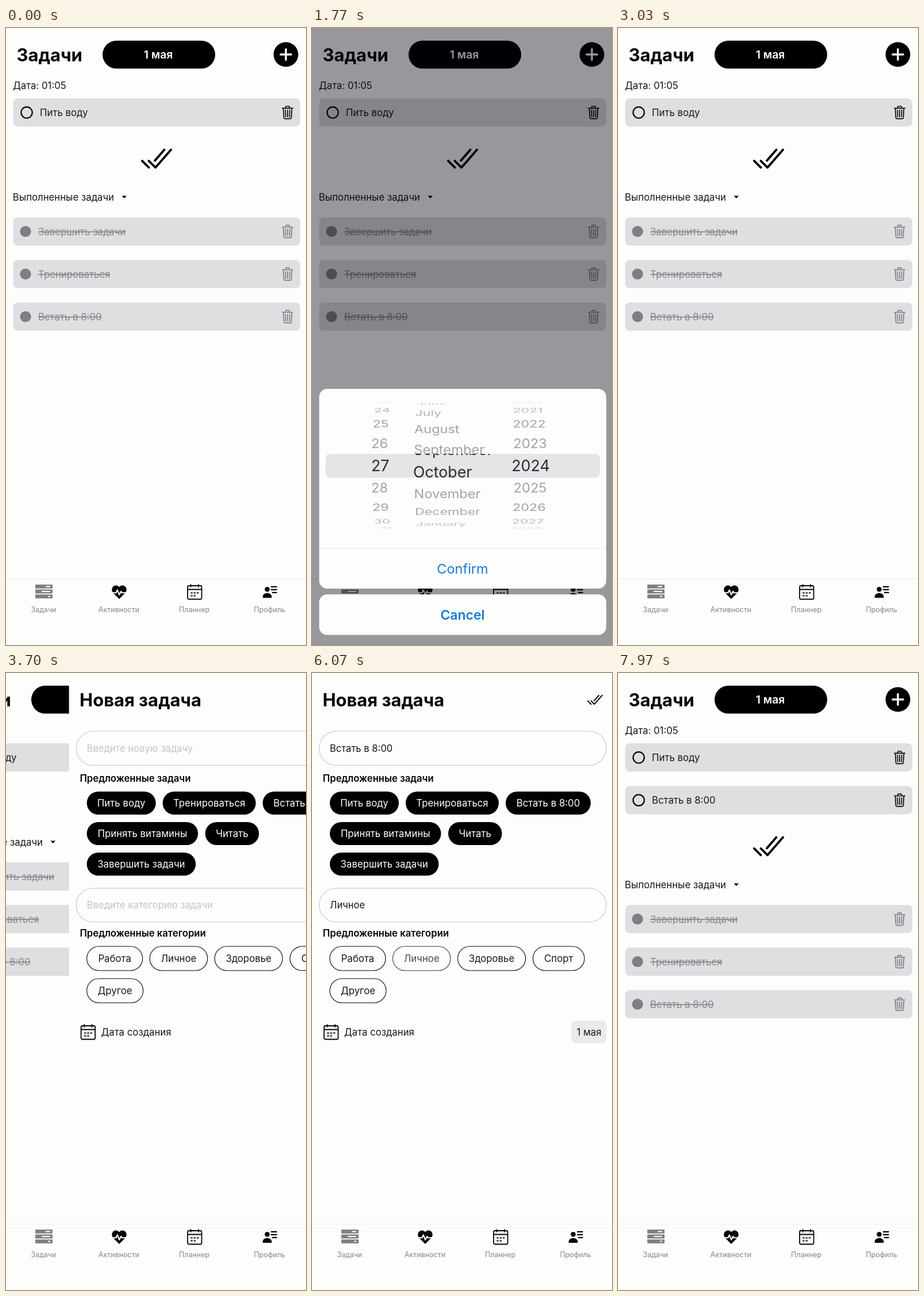
Recreate the animation shown at these times as an HTML page. Size 522 by 1072 pixels, loop 8000 ms.

```html
<!DOCTYPE html>
<html lang="ru">
<head>
<meta charset="utf-8">
<title>Задачи</title>
<style>
html, body { margin: 0; width: 100%; height: 100%; overflow: hidden; background: #fdfdfc; }
svg { display: block; width: 100vw; height: 100vh; }
text { font-family: Inter, "Open Sans", sans-serif; white-space: pre; }
.line { fill: none; stroke: currentColor; stroke-linecap: round; stroke-linejoin: round; }
</style>
</head>
<body>
<svg id="stage" viewBox="0 0 522 1072"></svg>
<script>
const LOOP = 8000, W = 522;
const PAPER = '#fdfdfc', INK = '#050408', SOFT = '#19181c', GRAY = '#807e83', CARD = '#e0dee1', BLUE = '#147bd6';
const MONTHS = ['January', 'February', 'March', 'April', 'May', 'June', 'July',
  'August', 'September', 'October', 'November', 'December'];

// Markup helpers
const text = (x, y, size, str, { weight = 400, fill = weight > 400 ? INK : SOFT, anchor = 'start', extra = '' } = {}) =>
  `<text x="${x}" y="${y + size * 0.36}" font-size="${size}" font-weight="${weight}" fill="${fill}" text-anchor="${anchor}" ${extra}>${str}</text>`;
const rect = (x, y, w, h, r, fill, extra = '') =>
  `<rect x="${x}" y="${y}" width="${w}" height="${h}" rx="${r}" fill="${fill}" ${extra}/>`;
const group = (id, body, extra = '') => `<g id="${id}" ${extra}>${body}</g>`;
const icon = (cx, cy, scale, color, body) =>
  `<g class="line" color="${color}" stroke-width="32" transform="translate(${cx} ${cy}) scale(${scale}) translate(-256 -256)">${body}</g>`;

const trash = (y, color) => icon(490, y, 0.0521, color, `<path d="M112 112l20 320c1 18 14 32 32 32h184c18 0 31-14 32-32l20-320
  M80 112h352M192 112V72a24 24 0 0 1 24-24h80a24 24 0 0 1 24 24v40M256 176v224M184 176l8 224M328 176l-8 224"/>`);
const checks = (cx, cy, scale) => icon(cx, cy, scale, INK,
  '<path d="M464 128L240 384l-96-96M144 384l-96-96M368 128L232 284"/>');
const calendar = (x, y) => `<g class="line" color="${INK}" stroke-width="1.8" transform="translate(${x} ${y})">
  <rect x="1" y="3" width="24.5" height="23.5" rx="2.5"/>
  <path d="M1 9.5h24.5M6.5 1v4M20 1v4M7 15.5h2M12.3 15.5h2M17.6 15.5h2M7 20.5h2M12.3 20.5h2" /></g>`;

function openTask(y, name) {
  return rect(12.5, y - 24.5, 499.5, 49, 8, CARD) +
    `<circle cx="36" cy="${y}" r="9.7" fill="none" stroke="${INK}" stroke-width="2.2"/>` +
    text(59, y, 16.8, name) + trash(y, INK);
}
function doneTask(y, name) {
  return rect(12.5, y - 24.5, 499.5, 49, 8, CARD) +
    `<circle cx="34" cy="${y}" r="9.6" fill="${GRAY}"/>` +
    text(56, y, 16.8, name, { fill: '#87858a', extra: 'text-decoration="line-through"' }) + trash(y, GRAY);
}

const listScreen = rect(0, 0, W, 1072, 0, PAPER) +
  text(18.5, 46.5, 31, 'Задачи', { weight: 700 }) +
  rect(168, 22, 196, 48.5, 24.2, '#000') +
  text(265, 46.5, 19.3, '1 мая', { fill: '#fff', weight: 600, anchor: 'middle' }) +
  '<circle cx="487" cy="46" r="21.5" fill="#000"/>' +
  '<path class="line" color="#fff" stroke-width="3.4" d="M477.8 46h18.4M487 36.8v18.4"/>' +
  text(12, 99.5, 16.8, 'Дата: 01:05') +
  openTask(146.8, 'Пить воду') +
  group('added', openTask(221, 'Встать в 8:00')) +
  group('rest', checks(262, 227, 0.1205) +
    text(11.8, 293.5, 16.8, 'Выполненные задачи') +
    `<path d="M201.5 291.5h8.6l-4.3 4.6z" fill="${INK}"/>` +
    ['Завершить задачи', 'Тренироваться', 'Встать в 8:00'].map((s, i) => doneTask(353.5 + i * 74, s)).join(''));

function chip(x, y, w, name, dark, id = '') {
  const h = dark ? 40 : 42;
  const box = dark ? rect(x, y, w, h, 20, '#000')
    : rect(x, y, w, h, 21, PAPER, `stroke="${INK}" stroke-width="1.1"`);
  return `<g id="${id}">${box}${text(x + w / 2, y + h / 2, 16.8, name, { fill: dark ? '#fff' : SOFT, anchor: 'middle' })}</g>`;
}
const field = (id, y, h, hint) =>
  rect(12.5, y, 499.5, h, h / 2, PAPER, 'stroke="#c6c4d2" stroke-width="1.1"') +
  `<g id="${id}">${text(31, y + h / 2, 16.6, hint, { fill: '#c5c4c8' })}</g>`;

const formScreen = rect(0, 0, W, 1072, 0, PAPER) +
  text(18.5, 46.5, 30.9, 'Новая задача', { weight: 700 }) +
  checks(492.3, 46.5, 0.0603) +
  field('taskField', 101, 59.5, 'Введите новую задачу') +
  text(18.8, 182.8, 16.7, 'Предложенные задачи', { weight: 600 }) +
  chip(31, 206, 120, 'Пить воду', true) +
  chip(163, 206, 162, 'Тренироваться', true) +
  chip(337, 206, 148, 'Встать в 8:00', true, 'taskChip') +
  chip(31, 259, 193.5, 'Принять витамины', true) +
  chip(237, 259, 93.5, 'Читать', true) +
  chip(31, 312, 189.5, 'Завершить задачи', true) +
  field('kindField', 374, 58.5, 'Введите категорию задачи') +
  text(18.8, 451.8, 16.7, 'Предложенные категории', { weight: 600 }) +
  chip(31, 475, 97, 'Работа') +
  chip(140.5, 475, 100.5, 'Личное', false, 'kindChip') +
  chip(253.5, 475, 118, 'Здоровье') +
  chip(384.5, 475, 89.5, 'Спорт') +
  chip(31, 531, 98, 'Другое') +
  calendar(20, 610) +
  text(56, 624, 16.8, 'Дата создания') +
  rect(451.5, 604, 61, 39, 8, '#ebe9ec') +
  text(482, 624, 16.8, '1 мая', { anchor: 'middle' });

const tabBar = rect(0, 957, W, 115, 0, PAPER) + rect(0, 957, W, 1, 0, '#eeeede') +
  [[967, 69, 8], [975.6, 62, 15], [984.2, 73, 4]].map(([y, x, w]) =>
    rect(51, y, 30, 6.8, 1, GRAY) + rect(x, y + 2.4, w, 2, 0, PAPER)).join('') +
  `<path d="M197 992l-10.6-10.6c-4-4.4-2.2-12 4-12.9 2.9-.4 5.2.9 6.6 3.1 1.4-2.2 3.7-3.5 6.6-3.1 6.2.9 8 8.5 4 12.9z" fill="${INK}"/>
   <path class="line" color="${PAPER}" stroke-width="2.1" d="M184 981.3h7.5l2.3-5 3.4 8.5 3-6 1.5 2.5H210"/>` +
  calendar(315, 966) +
  `<circle cx="454.5" cy="975.3" r="4.3" fill="${INK}"/>
   <path d="M446.7 990v-2.2c0-3.8 4.2-6 7.8-6s7.8 2.2 7.8 6v2.2z" fill="${INK}"/>
   <path d="M461 970.8h10.5M461 975.8h10.5M463 980.8h8.5" stroke="${INK}" stroke-width="2.3"/>` +
  ['Задачи', 'Активности', 'Планнер', 'Профиль'].map((s, i) =>
    text(65.5 + i * 131, 1010, 12.5, s, { fill: '#878589', anchor: 'middle' })).join('');

const sheet = rect(12.5, 627, 499.5, 347, 14, PAPER) +
  rect(23.5, 740, 477.5, 41.5, 8, '#e6e4e7') +
  '<g id="dimRows" clip-path="url(#around)"></g><g id="lensRows" clip-path="url(#lens)"></g>' +
  rect(12.5, 904, 499.5, 1, 0, '#e9e8ec') +
  text(262, 940, 23.5, 'Confirm', { fill: BLUE, anchor: 'middle' }) +
  rect(12.5, 984, 499.5, 70.5, 14, PAPER) +
  text(262, 1020, 23, 'Cancel', { fill: BLUE, weight: 600, anchor: 'middle' });

document.getElementById('stage').innerHTML =
  `<defs><clipPath id="lens"><path d="M12 740h500v41.5H12z"/></clipPath>
   <clipPath id="around"><path d="M12 650h500v90H12zM12 781.5h500V870H12z"/></clipPath></defs>` +
  group('list', listScreen) + group('form', formScreen) + tabBar +
  rect(0, 0, W, 1072, 0, '#04000a', 'id="shade"') + group('sheet', sheet);

const $ = id => document.getElementById(id);
const show = (el, on) => el.setAttribute('display', on ? 'inline' : 'none');
const move = (el, x, y) => el.setAttribute('transform', `translate(${x} ${y})`);

// Steps are [time, value, ease-out power]
function track(steps, t) {
  let [t0, v0] = steps[0];
  for (const [t1, v1, power = 1] of steps) {
    if (t < t1) return t <= t0 ? v0 : v0 + (v1 - v0) * (1 - (1 - (t - t0) / (t1 - t0)) ** power);
    [t0, v0] = [t1, v1];
  }
  return v0;
}
// Critically damped settling, from 0 to 1
function settle(ms) {
  if (ms <= 0) return 0;
  const k = ms * 0.029;
  return k > 9 ? 1 : 1 - (1 + k) * Math.exp(-k);
}

const SHEET = [[460, 0], [700, 1, 3], [2860, 1], [3010, 0, 1.3]];
const PUSH = 3600, POP = 6680;
const TASK_TAP = 5300, KIND_TAP = 5980;

const mod = (n, m) => ((n % m) + m) % m;
const wheels = [
  { x: 131.5, lensX: 134.5, anchor: 'end', label: n => mod(n, 31) + 1,
    steps: [[820, 0], [1350, -5, 2.5], [2050, -5], [2500, -2, 2]] },
  { x: 177, lensX: 176, anchor: 'start', label: n => MONTHS[mod(n, 12)],
    steps: [[1420, 4], [1770, 8.7], [2150, 11, 2], [2650, 11], [2830, 10.34], [2950, 10, 2]] },
  { x: 380, lensX: 380.5, anchor: 'middle', label: n => 2024 + n, steps: [[0, 0]] }
];

function addRow(layer, size, fill, anchor) {
  layer.insertAdjacentHTML('beforeend', text(0, 0, size, '', { fill, anchor }));
  return layer.lastElementChild;
}
for (const wheel of wheels) {
  wheel.rows = Array.from({ length: 9 }, () => [
    addRow($('dimRows'), 23.8, '#a3a2a5', wheel.anchor),
    addRow($('lensRows'), 26.8, '#2d2b31', wheel.anchor)
  ]);
}

function turn(wheel, t) {
  const pos = track(wheel.steps, t), mid = Math.round(pos);
  wheel.rows.forEach(([dim, lens], i) => {
    const n = mid + i - 4, angle = (n - pos) * 20.5 * Math.PI / 180;
    const cos = Math.cos(angle), far = 1 - 0.07 * (1 - cos);
    const y = 760.3 + 110 * Math.sin(angle);
    [[dim, wheel.x], [lens, wheel.lensX]].forEach(([el, x]) => {
      show(el, cos > 0.04);
      el.textContent = wheel.label(n);
      el.setAttribute('transform',
        `translate(${W / 2 + 1 + (x - W / 2 - 1) * far} ${y}) scale(${far} ${far * Math.max(cos, 0.01)})`);
    });
    dim.setAttribute('opacity', Math.min(1, 0.25 + cos));
  });
}

function fill(id, hint, value, on) {
  const el = $(id).firstElementChild;
  el.textContent = on ? value : hint;
  el.setAttribute('fill', on ? SOFT : '#c5c4c8');
}
const press = (id, tap, t) =>
  $(id).setAttribute('opacity', track([[tap - 70, 1], [tap, 0.3], [tap + 130, 1]], t));

function draw(t) {
  const pushed = settle(t - PUSH) - settle(t - POP);
  move($('list'), -157 * pushed, 0);
  move($('form'), W * (1 - pushed), 0);
  show($('form'), pushed > 0);

  const saved = t >= POP;
  show($('added'), saved);
  move($('rest'), 0, saved ? 74 : 0);

  press('taskChip', TASK_TAP, t);
  press('kindChip', KIND_TAP, t);
  fill('taskField', 'Введите новую задачу', 'Встать в 8:00', t >= TASK_TAP);
  fill('kindField', 'Введите категорию задачи', 'Личное', t >= KIND_TAP);

  const open = track(SHEET, t);
  $('shade').setAttribute('opacity', 0.405 * open);
  show($('sheet'), open > 0);
  move($('sheet'), 0, 450 * (1 - open));
  if (open > 0) wheels.forEach(wheel => turn(wheel, t));
}

const start = performance.now();
function tick() {
  draw((performance.now() - start) % LOOP);
  requestAnimationFrame(tick);
}
tick();
</script>
</body>
</html>
```
